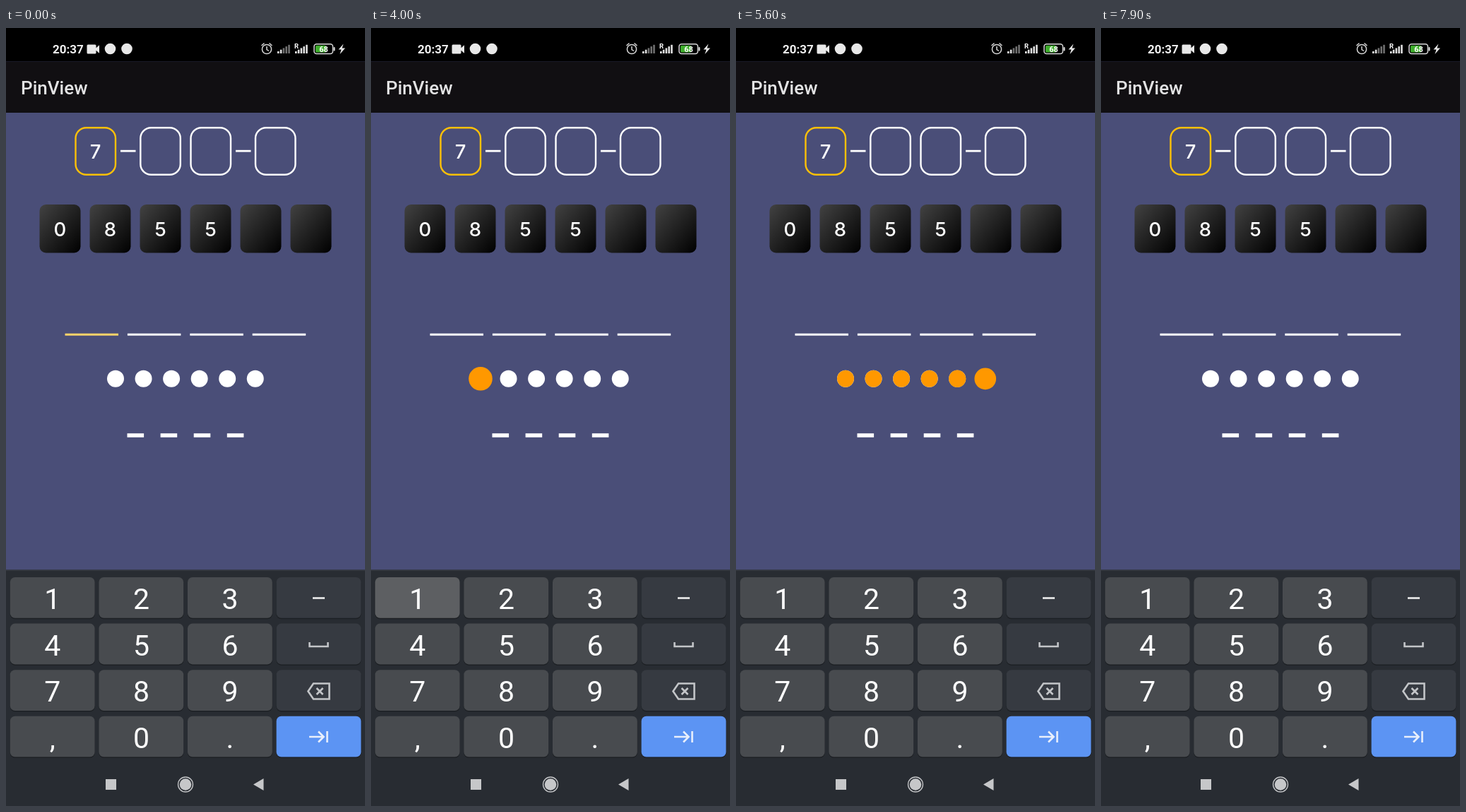
An HTML page that plays this animation: 508 by 1102 pixels, repeating every 8000 ms.

```html
<!DOCTYPE html>
<html lang="en">
<head>
<meta charset="utf-8">
<title>PinView</title>
<style>
  html, body { margin: 0; width: 100%; height: 100%; overflow: hidden; background: #4a4e78; }
  svg { display: block; width: 100vw; height: 100vh; }
  text { fill: #fff; font-family: Roboto, sans-serif; }
  .mid { text-anchor: middle; }
  .pin { font: 500 27.5px Inter, sans-serif; }
  .digit { font-size: 41px; }
  .icon { fill: none; stroke: #c3c5c8; stroke-width: 2.6; }
</style>
</head>
<body>
<svg id="stage" viewBox="0 0 508 1102">
  <defs>
    <linearGradient id="tile" x1="0" y1="0" x2="1" y2="1">
      <stop offset="0" stop-color="#424242"/>
      <stop offset="1" stop-color="#000"/>
    </linearGradient>
  </defs>
  <rect width="508" height="1102" fill="#4a4e78"/>
  <rect width="508" height="47.5"/>
  <rect y="47.5" width="508" height="72.5" fill="#110f12"/>
  <text x="21" y="94" font-size="26" font-weight="500" style="fill:#e3e3e4">PinView</text>

  <g id="status" fill="#e8e8e8">
    <text x="66" y="35.5" font-size="17" font-weight="700" style="fill:#f0f0f0">20:37</text>
    <path d="M116 23.5h10q1.500 0 1.500 1.500v3.200l4.500-4v11.600l-4.500-4v3.200q0 1.500-1.500 1.500h-10q-1.500 0-1.500-1.500v-10q0-1.500 1.500-1.500z"/>
    <circle cx="147.500" cy="29.500" r="7.800"/>
    <circle cx="171" cy="29.500" r="7.800"/>
    <g fill="none" stroke="#d8d8d8" stroke-width="1.500">
      <circle cx="369" cy="30" r="6.600"/>
      <path d="M369 26v4.500l3 2M361.500 25l4-3.500M376.500 25l-4-3.500"/>
      <rect x="436" y="22.800" width="26.500" height="13.800" rx="3.500"/>
    </g>
    <rect x="438" y="24.800" width="15" height="9.800" rx="1.500" fill="#3fae2c"/>
    <rect x="463.500" y="27" width="2" height="5.500" rx="1"/>
    <text class="mid" x="449.500" y="33.700" font-size="11" font-weight="700">68</text>
    <text x="408" y="28.500" font-size="9.500" font-weight="700">R</text>
    <path d="M477.500 22.500l-7 8h4l-2 6.500 7.500-8.500h-4.500z"/>
  </g>

  <g id="fields"></g>
  <rect y="767.500" width="508" height="334.500" fill="#282c32"/>
  <rect y="767.500" width="508" height="1.500" fill="#34383f"/>
  <g id="keys"></g>

  <path d="M434 807.500h17" class="icon" style="stroke:#eee"/>
  <path d="M429.500 870v6h26v-6" class="icon"/>
  <path d="M427.500 939.500l7.500-11h22.500v22h-22.500zM439.500 935l9 9M448.500 935l-9 9" class="icon"/>
  <path d="M429 1004h20M442 996.500l7.500 7.500-7.500 7.500M454.500 996v16" class="icon" style="stroke:#e9effb"/>

  <g fill="#c6c7c9">
    <rect x="141" y="1064" width="15" height="15"/>
    <circle cx="254" cy="1071.500" r="8.300"/>
    <circle cx="254" cy="1071.500" r="10.500" fill="none" stroke="#c6c7c9" stroke-width="1.300"/>
    <path d="M350 1071.500l14.500-8.500v17z"/>
  </g>
</svg>
<script>
const LOOP = 8000, STEP = 100;
const R = 12, PEAK = 19.5, RISE = 200, SETTLE = 600, SHRINK = 300;
const $ = id => document.getElementById(id);

function add(parent, tag, attrs, label) {
  const el = document.createElementNS('http://www.w3.org/2000/svg', tag);
  for (const k in attrs) el.setAttribute(k, attrs[k]);
  if (label) el.textContent = label;
  parent.append(el);
  return el;
}

const fields = $('fields'), keyboard = $('keys');

// Signal bars
[[384, 1], [409, 4]].forEach(([x, lit]) => {
  for (let i = 0; i < 5; i++) {
    const h = 3 + i * 2.3;
    add($('status'), 'rect', { x: x + i * 3.8, y: 36 - h, width: 2.6, height: h,
      fill: i <= lit ? '#e0e0e0' : '#707070' });
  }
});

// Outlined boxes with separators
[98.5, 190.3, 261.5, 353].forEach((x, i) => add(fields, 'rect', {
  x, y: 141.2, width: 56.5, height: 66.6, rx: 15, fill: 'none',
  stroke: i ? '#fff' : '#ffc107', 'stroke-width': 2.4 }));
add(fields, 'text', { class: 'mid pin', x: 126.5, y: 185 }, '7');
[162, 325].forEach(x => add(fields, 'rect', { x, y: 172.8, width: 21.5, height: 2.8, fill: '#fff' }));

// Gradient tiles
for (let i = 0; i < 6; i++) {
  const x = 47.5 + i * 71;
  add(fields, 'rect', { x, y: 250, width: 58, height: 68.5, rx: 9, fill: 'url(#tile)' });
  add(fields, 'text', { class: 'mid pin', x: x + 29, y: 295 }, '0855'[i] || '');
}

const lines = [], dots = [];
for (let i = 0; i < 4; i++) {
  lines.push(add(fields, 'rect', { x: 83.5 + i * 88.4, y: 432.7, width: 75.5, height: 3, fill: '#fff' }));
  add(fields, 'rect', { x: 171.5 + i * 47.1, y: 574.2, width: 23.6, height: 5.6, fill: '#fff' });
}
for (let i = 0; i < 6; i++) {
  const at = { cx: 155 + i * 39.55, cy: 496.8 };
  add(fields, 'circle', { ...at, r: R, fill: '#fff' });
  dots.push(add(fields, 'circle', { ...at, r: 0, fill: '#ff9800' }));
}

// Keyboard: last column holds function keys
const keys = {};
['123-', '456_', '789<', ',0.>'].forEach((row, j) => [...row].forEach((c, i) => {
  const x = 5.8 + i * 125.6, y = 778 + j * 65.6;
  const base = c === '>' ? '#5c94f3' : i === 3 ? '#363a41' : '#484b4f';
  const box = { x, width: 119.8, height: 57.8, rx: 7 };
  add(keyboard, 'rect', { ...box, y: y + 1.5, fill: '#1d2024' });
  keys[c] = { base, el: add(keyboard, 'rect', { ...box, y, fill: base }) };
  if (i < 3) add(keyboard, 'text', { class: 'mid digit', x: x + 60, y: y + 45 }, c);
}));

const typed = [3680, 4050, 4320, 4600, 4893, 5200];
const erased = [7400, 7340, 7280, 7220, 6820, 6300];
const presses = [
  ...[...'115445'].map((c, i) => [c, typed[i] - 85, typed[i], '#5d5f62']),
  ['<', 6300, 6450, '#4a4b53'],
  ['<', 6800, 7400, '#4a4b53'],
];
const tint = [[0, .7], [200, 0], [1300, 0], [1600, 1], [2250, 1], [2600, 0], [LOOP, 0]];

function lerpAt(table, t) {
  const i = table.findIndex(([at]) => at > t);
  const [t0, a] = table[i - 1], [t1, b] = table[i];
  return a + (b - a) * (t - t0) / (t1 - t0);
}

// Pop past full size, settle, then shrink away
function radius(i, t) {
  const age = t - typed[i], gone = t - erased[i];
  if (age <= 0) return 0;
  if (gone > 0) return R * Math.max(0, 1 - gone / SHRINK);
  if (age < RISE) return PEAK * Math.sin(age / RISE * Math.PI / 2);
  const rest = Math.max(0, 1 - (age - RISE) / SETTLE);
  return R + (PEAK - R) * rest * rest;
}

function draw(t) {
  const a = lerpAt(tint, t);
  lines[0].setAttribute('fill', `rgb(255,${255 - 62 * a},${255 - 215 * a})`);
  dots.forEach((dot, i) => dot.setAttribute('r', radius(i, t).toFixed(2)));
  for (const c in keys) {
    const hit = presses.find(([k, from, to]) => k === c && t >= from && t < to);
    keys[c].el.setAttribute('fill', hit ? hit[3] : keys[c].base);
  }
}

const start = performance.now();
function frame() {
  const t = (performance.now() - start) % LOOP;
  draw(Math.floor(t / STEP) * STEP);
  requestAnimationFrame(frame);
}
frame();
</script>
</body>
</html>
```
